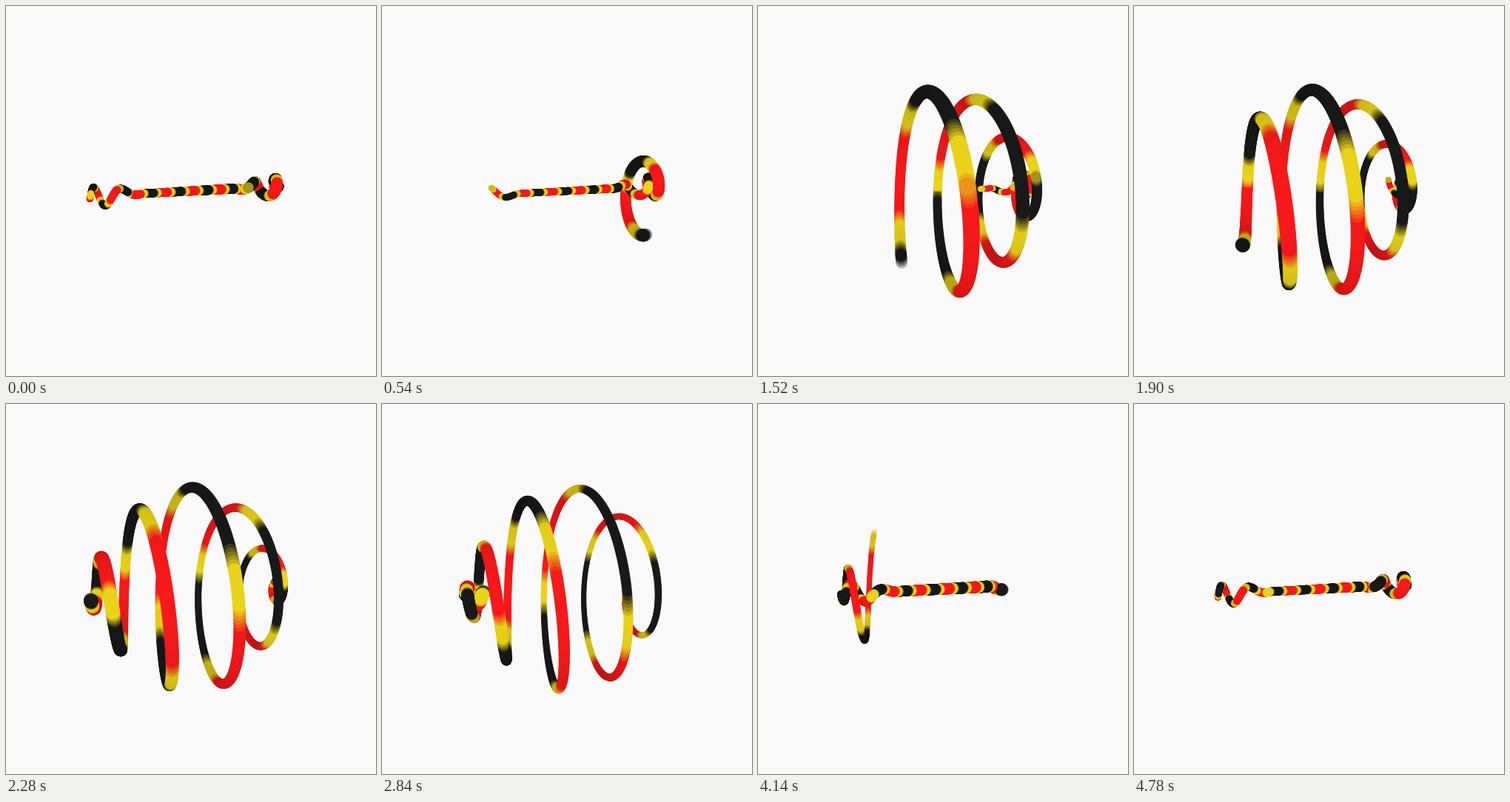
An HTML page with a canvas for the animation above (4800 ms loop, 500x500 px).

```html
<!DOCTYPE html>
<html lang="en">
<head>
<meta charset="utf-8">
<title>Coral snake</title>
<style>
  html, body { margin: 0; width: 100%; height: 100%; overflow: hidden; background: #f9f9f9; }
  canvas { display: block; width: 100%; height: 100%; }
</style>
</head>
<body>
<canvas id="stage" width="500" height="500"></canvas>
<script>
const SIZE = 500;
const stage = document.getElementById('stage').getContext('2d');
const buffer = document.createElement('canvas');
buffer.width = buffer.height = SIZE;
const ctx = buffer.getContext('2d');

const TAU = Math.PI * 2;
const LOOP = 4800;
const SHUTTER = 10, SAMPLES = 6;
const COUNT = 1500;
const RADIUS = 131;
const CAMERA = 433;
const YAW = 0.265, PITCH = 0.2;
const HEAD_R = 8.7, TAIL_R = 3.8;
const BANDS = 10.65, BAND_START = 0.13, YELLOW_HALF = 0.065;
const STRAIGHT = Math.sin(Math.PI / 3);
const SHADES = 24;

const shadesOf = rgb => Array.from({ length: SHADES + 1 }, (_, i) => {
  const light = 0.74 + 0.26 * i / SHADES;
  return `rgb(${rgb.map(c => Math.round(c * light))})`;
});
const BLACK = shadesOf([26, 26, 26]);
const YELLOW = shadesOf([234, 211, 26]);
const RED = shadesOf([246, 26, 27]);

// Distance from the axis: wide outside, a small reversed coil, then straight.
function spread(angle) {
  const s = Math.sin(angle);
  return s < -STRAIGHT ? 0 : s * (s + STRAIGHT) / (1 + STRAIGHT);
}

function bandShades(phase) {
  const d = Math.abs(phase - Math.round(phase));
  if (Math.abs(d - 0.25) < YELLOW_HALF) return YELLOW;
  return d < 0.25 ? BLACK : RED;
}

const beads = Array.from({ length: COUNT }, (_, i) => {
  const lag = i / (COUNT - 1);
  return {
    lag: lag * Math.PI,
    size: HEAD_R + (TAIL_R - HEAD_R) * lag,
    shades: bandShades(BAND_START + BANDS * lag),
    shade: 0, x: 0, y: 0, z: 0
  };
});
const byDepth = beads.slice();

function place(bead, head) {
  const angle = head - bead.lag;
  const turn = 12 * angle + 2 * head;
  const along = RADIUS * Math.cos(angle);
  const out = RADIUS * spread(angle);
  const up = out * Math.cos(turn);
  const front = -out * Math.sin(turn);
  const depth = front * Math.cos(YAW) - along * Math.sin(YAW);
  bead.x = along * Math.cos(YAW) + front * Math.sin(YAW);
  bead.y = up * Math.cos(PITCH) - depth * Math.sin(PITCH);
  bead.z = up * Math.sin(PITCH) + depth * Math.cos(PITCH);
}

// The body is darker where it runs toward or away from the viewer.
function light(bead, i) {
  const other = beads[i ? i - 1 : 1];
  const flat = Math.hypot(bead.x - other.x, bead.y - other.y);
  const full = Math.hypot(flat, bead.z - other.z) || 1;
  bead.shade = Math.round(SHADES * flat / full);
}

function drawSnake(time) {
  const head = time / LOOP * TAU;
  for (const bead of beads) place(bead, head);
  beads.forEach(light);
  byDepth.sort((a, b) => a.z - b.z);

  ctx.fillStyle = '#f9f9f9';
  ctx.fillRect(0, 0, SIZE, SIZE);
  for (const { x, y, z, size, shades, shade } of byDepth) {
    const scale = CAMERA / (CAMERA - z);
    ctx.fillStyle = shades[shade];
    ctx.beginPath();
    ctx.arc(SIZE / 2 + x * scale, SIZE / 2 - y * scale, size * scale, 0, TAU);
    ctx.fill();
  }
}

// Motion blur: an even average of several moments.
function draw() {
  const time = performance.now() % LOOP;
  for (let i = 0; i < SAMPLES; i++) {
    drawSnake(time + SHUTTER * i / SAMPLES);
    stage.globalAlpha = 1 / (i + 1);
    stage.drawImage(buffer, 0, 0);
  }
  requestAnimationFrame(draw);
}
draw();
</script>
</body>
</html>
```
